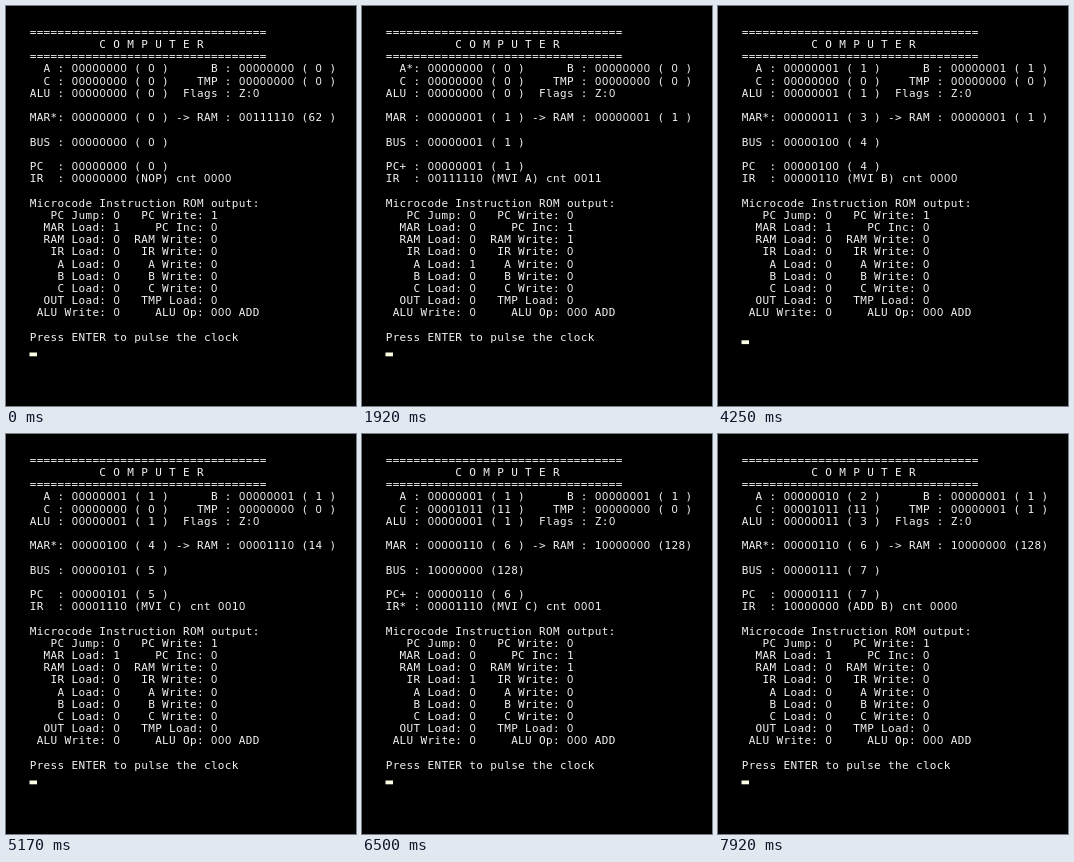
An HTML page with a canvas for the animation above (8 s loop, 350 px wide and 400 px high).

```html
<!DOCTYPE html>
<html lang="en">
<head>
<meta charset="utf-8">
<title>Computer</title>
<style>
html, body { margin: 0; width: 100%; height: 100%; overflow: hidden; background: #000; }
canvas { display: block; }
</style>
</head>
<body>
<canvas id="screen" width="350" height="400"></canvas>
<script>
const ctx = document.getElementById('screen').getContext('2d');
const LOOP = 8000, FPS = 12;
const LEFT = 23.5, BASE = 29.8, COL = 6.97, ROW = 12.2;
const RAM = [62, 1, 6, 1, 14, 11, 128];
const NAMES = { 0: 'NOP', 62: 'MVI A', 6: 'MVI B', 14: 'MVI C', 128: 'ADD B' };

// Tick at which each clock pulse lands, and pulses whose Enter key shows on screen
const PULSES = [0, 6, 12, 18, 25, 31, 37, 44, 51, 56, 61, 68, 73, 77, 82, 86, 92];
const ENTERS = [5, 9, 10];

// Control lines raised by the microcode for an instruction and counter value
function control(ir, cnt) {
  if (cnt === 0) return ['MAR Load', 'PC Write'];
  if (cnt === 1) return ['IR Load', 'RAM Write', 'PC Inc'];
  const [op, reg] = NAMES[ir].split(' ');
  if (op === 'MVI') return cnt === 2 ? ['MAR Load', 'PC Write'] : [reg + ' Load', 'RAM Write', 'PC Inc'];
  return cnt === 2 ? ['TMP Load', reg + ' Write'] : ['A Load', 'ALU Write'];
}

function settle(s) {
  s.RAM = RAM[s.MAR];
  s.ALU = s.A + s.TMP;
  s.on = control(s.IR, s.cnt);
  s.BUS = s[s.on.find(n => n.endsWith('Write')).split(' ')[0]];
  return s;
}

function pulse(s) {
  const next = { ...s, cnt: (s.cnt + 1) % 4 };
  next[s.on.find(n => n.endsWith('Load')).split(' ')[0]] = s.BUS;
  if (s.on.includes('PC Inc')) next.PC++;
  return settle(next);
}

const states = [settle({ A: 0, B: 0, C: 0, TMP: 0, MAR: 0, PC: 0, IR: 0, cnt: 0 })];
while (states.length < PULSES.length) states.push(pulse(states.at(-1)));

const bits = (n, size) => n.toString(2).padStart(size, '0');
const value = n => `${bits(n, 8)} (${(n < 10 ? ' ' + n : '' + n).padEnd(3)})`;

function lines(s, prompt) {
  const has = name => s.on.includes(name);
  const star = name => has(name + ' Load') ? '*' : ' ';
  const reg = name => `${name.padStart(3)}${star(name)}: ${value(s[name])}`;
  const flag = (name, width) => `${(name + ':').padStart(width)} ${+has(name)}`;
  const pair = (a, b) => flag(a, 11) + flag(b, 12);
  const bar = '='.repeat(34);
  return [
    bar,
    ' '.repeat(10) + 'C O M P U T E R',
    bar,
    reg('A') + '    ' + reg('B'),
    reg('C') + '    ' + reg('TMP'),
    reg('ALU') + '  Flags : Z:0',
    '',
    reg('MAR') + ' -> ' + reg('RAM'),
    '',
    reg('BUS'),
    '',
    `PC${has('PC Inc') ? '+' : ' '} : ${value(s.PC)}`,
    `IR${star('IR')} : ${bits(s.IR, 8)} (${NAMES[s.IR]}) cnt ${bits(s.cnt, 4)}`,
    '',
    'Microcode Instruction ROM output:',
    pair('PC Jump', 'PC Write'),
    pair('MAR Load', 'PC Inc'),
    ...['RAM', 'IR', 'A', 'B', 'C'].map(n => pair(n + ' Load', n + ' Write')),
    pair('OUT Load', 'TMP Load'),
    flag('ALU Write', 11) + '     ALU Op: 000 ADD',
    '',
    prompt ? 'Press ENTER to pulse the clock' : ''
  ];
}

function print(text, row) {
  [...text].forEach((ch, i) => {
    if (ch === ' ') return;
    // plain zero, without the dot of the monospaced face
    ctx.font = ch === '0' ? '11px "Noto Sans", sans-serif' : '11px "DejaVu Sans Mono", monospace';
    ctx.fillText(ch, LEFT + (i + 0.5) * COL, BASE + row * ROW);
  });
}

function draw(now) {
  const tick = Math.floor(now % LOOP * FPS / 1000 + 0.05);
  const step = PULSES.findLastIndex(p => p <= tick);
  const prompt = step === 0 || tick > PULSES[step];
  const entered = ENTERS.includes(step + 1) && tick === PULSES[step + 1] - 1;
  const cursorRow = entered ? 27 : prompt ? 26 : 25;

  ctx.fillStyle = '#000';
  ctx.fillRect(0, 0, 350, 400);
  ctx.fillStyle = '#f2f2f2';
  ctx.textAlign = 'center';
  lines(states[step], prompt).forEach(print);
  ctx.fillStyle = '#ffffe6';
  ctx.fillRect(LEFT, BASE + cursorRow * ROW - 0.5, 7.5, 3.8);
}

let start;
function loop(now) {
  start ??= now;
  draw(now - start);
  requestAnimationFrame(loop);
}
requestAnimationFrame(loop);
</script>
</body>
</html>
```
